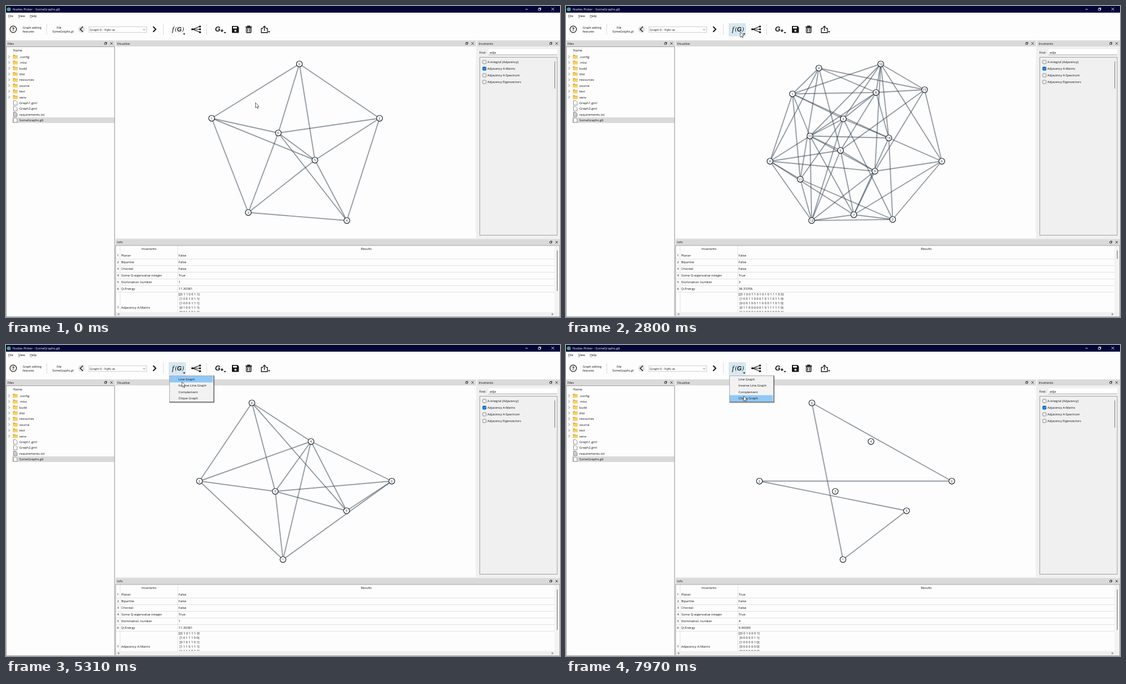
Write an HTML page that moves like this. It is 998 by 561 pixels and loops after 8000 ms.

```html
<!DOCTYPE html>
<html lang="en">
<head>
<meta charset="utf-8">
<title>Graph operations</title>
<style>
  html, body { margin: 0; width: 100%; height: 100%; overflow: hidden; background: #f0f0f0; }
  svg { display: block; width: 100vw; height: 100vh; }
  text { font-family: "Open Sans", "Noto Sans", sans-serif; font-size: 5.85px; fill: #111; white-space: pre; }
</style>
</head>
<body>
<svg id="stage" viewBox="0 0 998 561" preserveAspectRatio="none"></svg>
<script>
const LOOP = 8000;

// ---- SVG helpers ----
const rect = (x, y, w, h, fill, extra = '') =>
  `<rect x="${x}" y="${y}" width="${w}" height="${h}" fill="${fill}" ${extra}/>`;
const path = (d, stroke = '#111', width = 1, fill = 'none', extra = '') =>
  `<path d="${d}" stroke="${stroke}" stroke-width="${width}" fill="${fill}" ${extra}/>`;
const circle = (x, y, r, fill, extra = '') => `<circle cx="${x}" cy="${y}" r="${r}" fill="${fill}" ${extra}/>`;
const text = (x, y, s, size = 5.85, extra = '') =>
  `<text x="${x}" y="${y}" style="font-size:${size}px" ${extra}>${s}</text>`;
const middle = 'text-anchor="middle"';
const frame = color => `stroke="${color}" stroke-width="1"`;
const dropArrow = (x, y) => path(`M${x - 2.2} ${y}h4.4l-2.2 2.4z`, 'none', 0, '#111');

// ---- graphs ----
const points = s => s.split(' ').map(p => p.split(',').map(Number));
const adjacency = (n, joined) =>
  Array.from({ length: n }, (_, i) => Array.from({ length: n }, (_, j) => +(i !== j && joined(i, j))));
const fromEdges = (n, list) => {
  const edges = list.split(' ');
  return adjacency(n, (i, j) => edges.includes(`${i}${j}`) || edges.includes(`${j}${i}`));
};

const startMatrix = fromEdges(7, '01 02 05 06 13 15 16 24 25 26 34 35 36 45 46 56');
// Line-graph vertices are edges of a wheel with two hubs, p and q; they join when they share an end.
const wheelEdges = 'ap aq bc bq ae ep cd cp eq dp dq ab bp pq cq de'.split(' ');
const lineMatrix = adjacency(16, (i, j) => [...wheelEdges[i]].some(end => wheelEdges[j].includes(end)));
const rootMatrix = fromEdges(7, '01 03 04 05 12 13 14 23 24 26 34 35 36 45 46 56');
const complementMatrix = adjacency(7, (i, j) => !rootMatrix[i][j]);
const rootPoints = points('695,245.5 499,387 348.5,245.5 485,264 549.5,174 613.5,299 443,104.5');

const scenes = [
  { from: 0, matrix: startMatrix, planar: 'False', domination: 1, energy: '11.30381',
    at: points('528.5,104.5 370.5,202.5 673,202.5 436.5,372.5 614,387 556.5,278 490.5,229') },
  { from: 1750, matrix: lineMatrix, planar: 'False', domination: 3, energy: '38.33356',
    at: points('367.5,280 408,158.5 588.5,385 499.5,203.5 455.5,112 494.5,260.5 677,280 518.5,376.5 ' +
      '558.5,156 556.5,298 567,104.5 422,312.5 442.5,387 439.5,234.5 581.5,238 646,151') },
  { from: 4300, matrix: rootMatrix, planar: 'False', domination: 1, energy: '11.30381', at: rootPoints },
  { from: 6000, matrix: complementMatrix, planar: 'True', domination: 4, energy: '9.90069', at: rootPoints },
];

function drawGraph({ matrix, at }) {
  let edges = '', nodes = '';
  at.forEach(([x, y], i) => {
    for (let j = 0; j < i; j++)
      if (matrix[i][j]) edges += path(`M${x} ${y}L${at[j]}`, '#2c3c4c', 1.9, 'none', 'opacity=".5"');
    nodes += circle(x, y, 5.3, '#fff', 'stroke="#1c2228" stroke-width="1.15"') + text(x, y + 2, i, 5.7, middle);
  });
  return edges + nodes;
}

function drawResults({ matrix, planar, domination, energy }) {
  const large = matrix.length > 7;
  const values = [planar, 'False', 'False', 'True', domination, energy];
  const rows = matrix.slice(0, 5).map((row, i) =>
    text(i ? 312.6 : 311, 522.3 + i * 7.9, (i ? '[' : '[[') + row.join(' ') + ']', 5.78));
  return values.map((v, i) => text(311, 452.4 + i * 12, v)).join('') + rows.join('') +
    (large ? '' : text(200, 546, '7') + text(207.5, 546, 'Adjacency A-Matrix')) +
    rect(988, 433, 9, 127, '#f3f3f3') + rect(992.5, 441, 1.2, large ? 15 : 73, '#777');
}

// ---- window parts ----
function dock(x, y, w, title) {
  const r = x + w;
  return rect(x, y, w, 11, '#dadada') + text(x + 2.5, y + 7.8, title, 5.7) +
    (path(`M${r - 18.5} ${y + 4.5}h3v3h-3zM${r - 17.5} ${y + 4.5}v-1h3v3h-1`, '#222', .7) +
     path(`M${r - 8} ${y + 3.6}l4 4m0-4l-4 4`, '#222', .9));
}

function titleAndMenu() {
  return rect(0, 0, 998, 12, '#020536') + circle(5, 6, 3.6, '#4d9c8c') +
    text(12, 8.3, 'Nodes Picker - SomeGraphs.g6', 5.95, 'fill="#fff" class="light"').replace('px"', 'px;fill:#fff"') +
    path('M935.5 6h4.5M959 4.5h3.5v3.5h-3.5zM960 4.5v-1h3.5v3.5h-1M982.5 3l5 5m0-5l-5 5', '#fff', .8) +
    rect(0, 12, 998, 50, '#fdfdfd') +
    [[4, 'File', 3], [22, 'View', 3.4], [43, 'Help', 4]].map(([x, s, w]) =>
      text(x, 19.8, s, 5.7) + path(`M${x} 21h${w}`, '#333', .5)).join('');
}

function toolbar() {
  return circle(13, 42, 5.8, 'none', 'stroke="#111" stroke-width="1.2"') +
    text(13, 45.2, '?', 8.6, middle + ' font-weight="700"') +
    text(30, 41.4, 'Graph editing', 5.35) + text(30, 48, 'features', 5.35) +
    text(95.5, 41.4, 'File', 5.35, middle) + text(83.5, 48, 'SomeGraphs.g6', 5.35) +
    rect(121.8, 40, 5, 11, '#fdfdfd') +
    path('M73.5 32v20M283.5 32v20M361.5 32v20', '#d4d4d4', .8) +
    circle(136, 42, 6.2, '#e2e2e2') +
    path('M138.5 37.3l-4.8 4.7l4.8 4.7', '#333', 1.7) + path('M265 37.3l4.8 4.7l-4.8 4.7', '#111', 1.9) +
    rect(149.5, 37.5, 104, 10, '#fff', frame('#cfcfcf')) + text(151, 44.6, 'Graph 0 - FqN~w', 5.75) +
    path('M246.8 41.5l2.2 2.2l2.2-2.2', '#555', .8);
}

function toolIcons() {
  const serif = 'font-family:\'Liberation Serif\',serif;font-style:italic;';
  const sans = 'font-family:\'Liberation Sans\',sans-serif;font-style:italic;font-weight:700;';
  const glyph = (x, y, s, size, style) => `<text x="${x}" y="${y}" style="${style}font-size:${size}px">${s}</text>`;
  return glyph(299, 46, 'f', 13.5, serif) + glyph(304.6, 45.4, '(', 10.5, serif) +
    glyph(308, 46, 'G', 10.8, sans) + glyph(317, 45.4, ')', 10.5, serif) + dropArrow(321, 49.5) +
    path('M336 42L349 37M336 42h13M336 42L349 47', '#111', 1.1) +
    [[335.5, 42], [349.5, 37], [349.5, 42], [349.5, 47.3]].map(([x, y]) => circle(x, y, 1.8, '#111')).join('') +
    glyph(376.5, 46.2, 'G', 12.5, sans) + path('M386.5 44.5h5M389 42v5', '#111', 1.4) + dropArrow(394.3, 47) +
    path('M408 36h9l2.5 2.5v9q0 1-1 1h-10.500q-1 0-1-1v-10.500q0-1 1-1z', 'none', 0, '#111') +
    rect(409, 37.6, 7, 3, '#fff') + circle(413.3, 44.6, 1.9, '#fff') +
    path('M431.5 37.8h11.500M435 37v-.7h4.500v.7', '#111', 1.4) +
    path('M433 39.500h8.500v7.500q0 1-1 1h-6.500q-1 0-1-1zM435.500 41v5.500M439 41v5.500', '#111', 1.3) +
    path('M463 40.500h-3v7.500h11v-7.500h-3M465.500 45v-8M462.800 39l2.700-2.700l2.700 2.700', '#111', 1.3) + dropArrow(474, 45.5);
}

function filesPanel() {
  const names = ['.config', '.misc', 'build', 'dist', 'resources', 'source', 'test', 'venv',
    'Graph1.gml', 'Graph2.gml', 'requirements.txt', 'SomeGraphs.g6'];
  const rows = names.map((name, i) => {
    const y = 91.6 + i * 10.4;
    const icon = i < 8
      ? path(`M4.500 ${y - 2.2}l2.200 2.200l-2.200 2.200`, '#555', .8) +
        path(`M12.500 ${y + 3.2}v-6.700h3.300l1 1.200h4.200v5.500z`, 'none', 0, '#e6ab35') +
        rect(12.5, y - 1.3, 8.5, 4.5, '#f8d068')
      : path(`M13.500 ${y - 4}h4l2.500 2.500v5.500h-6.500z`, '#777', .8, i === 10 ? '#ccc' : '#fff');
    return icon + text(24, y + 2.2, name, 5.85);
  }).join('');
  return dock(0, 62, 196, 'Files') + rect(.5, 73.5, 195, 487, '#fdfdfd', frame('#a0a0a0')) +
    text(13, 82, 'Name') + rect(11, 201, 184, 10, '#d9d9d9') + rows;
}

function invariantsPanel() {
  const names = ['A-integral (Adjacency)', 'Adjacency A-Matrix', 'Adjacency A-Spectrum', 'Adjacency Eigenvectors'];
  return dock(849, 62, 149, 'Invariants') + text(852.5, 85.6, 'Find:', 5.5) +
    rect(869, 78, 124, 10, '#fff') + path('M869 88h124', '#999', .8) + text(871, 85.6, 'adja') +
    rect(853.5, 92.5, 139.5, 321, '#f0f0f0', frame('#a0a0a0')) + rect(988, 100, 1.2, 49, '#888') +
    names.map((name, i) => {
      const y = 101 + i * 12, on = i === 1;
      return rect(858.8, y - 3, 6, 6, on ? '#0067b8' : '#fafafa', `rx="1" stroke="${on ? '#0067b8' : '#666'}" stroke-width=".8"`) +
        (on ? path(`M860.2 ${y}l1.300 1.400l2.300-2.700`, '#fff', .8) : '') + text(867.3, y + 2.2, name, 5.6);
    }).join('');
}

function infoTable() {
  const names = ['Planar', 'Bipartite', 'Chordal', 'Some Q-eigenvalue integer', 'Domination number', 'Q-Energy'];
  return dock(197.5, 420.500, 800.5, 'Info') + rect(197.5, 432, 800, 128.5, '#fdfdfd', frame('#a0a0a0')) +
    text(257.5, 440.4, 'Invariants', 5.85, middle) + text(649, 440.4, 'Results', 5.85, middle) +
    path('M309.5 433v119M205.5 433v119', '#dedede', .8) +
    names.map((name, i) => text(200, 452.4 + i * 12, i + 1) + text(207.5, 452.4 + i * 12, name) +
      path(`M198 ${456.3 + i * 12}h790`, '#dadada', .8)).join('');
}

const bottomScrollbar = rect(198, 552, 799, 8, '#f0f0f0') +
  path('M204 553.800v4.600l-3.500-2.300zM983 553.800v4.600l3.500-2.300z', 'none', 0, '#999');

const menu = rect(295, 57, 81, 48, '#000', 'opacity=".18"') + rect(294.5, 55.5, 79.5, 47, '#f2f2f2', frame('#aaa')) +
  path('M294 103h80.500v-48', '#555', 1) + rect(295, 0, 77.5, 11.5, '#90c8f6', 'id="highlight"') +
  ['Line Graph', 'Inverse Line Graph', 'Complement', 'Clique Graph']
    .map((s, i) => text(310.7, 63.8 + i * 11.5, s, 5.75)).join('');

const stage = document.getElementById('stage');
stage.innerHTML = rect(0, 0, 998, 561, '#f0f0f0') + titleAndMenu() + toolbar() +
  rect(293, 31, 31, 23.5, '#d6e8f2', 'id="hover"') + toolIcons() + filesPanel() +
  dock(197.5, 62, 649, 'Visualize') + rect(197.5, 73, 649, 345.5, '#fdfdfd') + invariantsPanel() + infoTable() +
  scenes.map(s => `<g class="scene">${drawGraph(s)}${drawResults(s)}</g>`).join('') + bottomScrollbar +
  `<g id="menu">${menu}</g>` +
  path('M0 0v9.200l2.100-1.900l1.500 3.300l1.500-.7l-1.500-3.200h2.800z', '#222', .7, '#fff', 'id="cursor"');

// ---- motion ----
const cursorKeys = [
  [0, 449.5, 174.5], [200, 449.5, 174.5], [850, 313, 46], [1020, 313, 46], [1300, 319.5, 64], [1950, 319.5, 64],
  [2450, 314, 47], [3350, 314, 47], [3800, 316.5, 71.5], [4450, 316.5, 71.5], [4800, 314, 47], [5000, 314, 47],
  [5310, 317, 66.5], [5600, 320, 81.5], [6550, 320, 81.5], [6950, 314, 47], [7300, 314, 47], [7850, 320, 92],
  [LOOP, 320, 92],
];
const menuOpen = [[1000, 1680], [3100, 4200], [4950, 5900], [7200, LOOP]];

function cursorAt(t) {
  const i = cursorKeys.findIndex(k => k[0] > t);
  const [t0, x0, y0] = cursorKeys[i - 1], [t1, x1, y1] = cursorKeys[i];
  const p = (t - t0) / (t1 - t0), e = p * p * (3 - 2 * p);
  return [x0 + (x1 - x0) * e, y0 + (y1 - y0) * e];
}

const byId = id => document.getElementById(id);
const [hover, menuBox, highlight, cursor] = ['hover', 'menu', 'highlight', 'cursor'].map(byId);
const sceneGroups = [...document.querySelectorAll('.scene')];
const show = (el, on) => { el.style.display = on ? '' : 'none'; };

function render(now) {
  const t = now % LOOP;
  const [x, y] = cursorAt(t);
  const open = menuOpen.some(([a, b]) => t >= a && t < b);
  const item = Math.floor((y - 55.5) / 11.5);
  const current = scenes.filter(s => s.from <= t).length - 1;

  sceneGroups.forEach((g, i) => show(g, i === current));
  show(menuBox, open);
  show(highlight, item >= 0 && item < 4);
  highlight.setAttribute('y', 56 + item * 11.5);
  show(hover, open || (x > 293 && x < 324 && y > 31 && y < 54.5));
  cursor.setAttribute('transform', `translate(${x} ${y})`);
}

const start = performance.now();
function tick() {
  render(performance.now() - start);
  requestAnimationFrame(tick);
}
tick();
</script>
</body>
</html>
```
